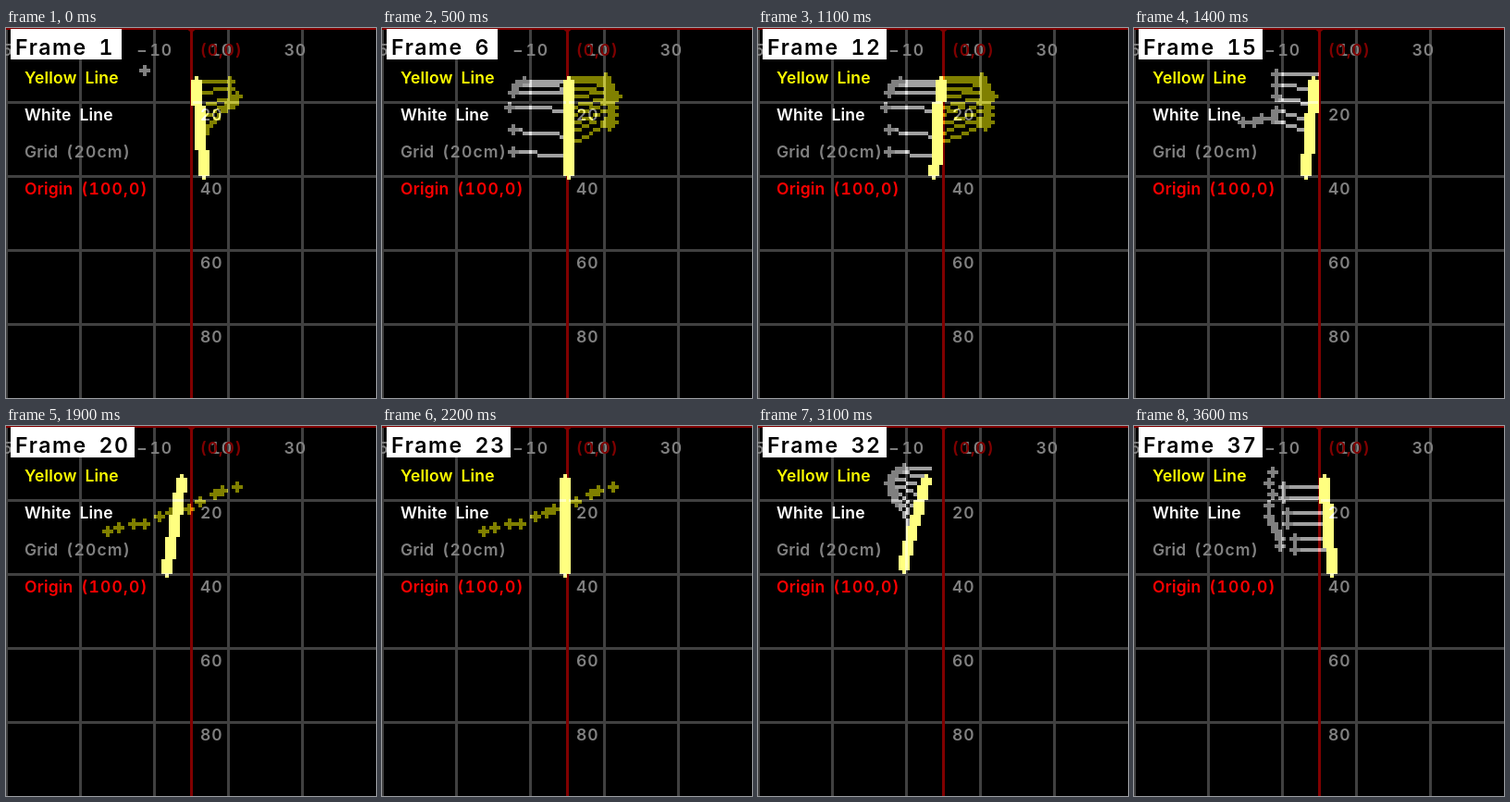
Write an HTML page with a canvas that moves like this. It is 400 px wide and 400 px high and loops after 3.7 s.

```html
<!DOCTYPE html>
<html lang="en">
<head>
<meta charset="utf-8">
<title>Lane line tracker</title>
<style>
  html, body { margin: 0; width: 100%; height: 100%; overflow: hidden; background: #000; }
  svg, canvas { position: absolute; left: 0; top: 0; width: 400px; height: 400px; }
  canvas { image-rendering: pixelated; mix-blend-mode: plus-lighter; }
  text {
    font: 600 17.5px Inter, "Liberation Sans", sans-serif;
    font-variant-numeric: tabular-nums;
    letter-spacing: .2px; word-spacing: 4px; white-space: pre;
  }
  .num { letter-spacing: .9px; fill: #808080; }
  .wide { letter-spacing: 1.2px; }
  #count { font-size: 23.1px; letter-spacing: 1.6px; word-spacing: 5px; }
</style>
</head>
<body>
<svg viewBox="0 0 400 400">
  <path id="rules" stroke="#404040" stroke-width="3"/>
  <path d="M0 .5H400M200.5 0V400" stroke="#800000" stroke-width="3"/>
  <circle cx="200.5" cy="0" r="4" fill="#800000"/>
  <g id="labels"></g>
  <text class="num" x="210" y="30" style="fill:#800000">(0,0)</text>
</svg>
<canvas id="cells" width="100" height="100"></canvas>
<svg viewBox="0 0 400 400">
  <rect id="plate" x="5" y="1" width="120" height="33" fill="#fff"/>
  <text id="count" x="10" y="28.5">Frame 1</text>
  <text x="20" y="60" fill="#ff0">Yellow Line</text>
  <text x="20" y="100" fill="#fff">White Line</text>
  <text x="20" y="140" fill="#808080">Grid <tspan class="wide">(20cm)</tspan></text>
  <text x="20" y="180" fill="#f00">Origin <tspan class="wide">(100,0)</tspan></text>
</svg>
<script>
const STEP = 100, STEPS = 37, TOP = 14, LENGTH = 25.1;
const GOLD = '#808000', GRAY = '#808080', PALE = '#a0a0a0', LINE = '#ffff80';
const $ = id => document.getElementById(id);
const ctx = $('cells').getContext('2d');

// Grid rules and axis labels
let rules = '', labels = '';
for (let p = 0; p < 400; p += 80) {
  rules += `M${p + .5} 0V400M0 ${p + .5}H400`;
  const v = p / 4 - 50;
  const text = v < 0 ? `−<tspan dx="2">${-v}</tspan>` : v;
  labels += `<text class="num" x="${p + (v < 0 ? 20 : 5)}" y="30" text-anchor="end">${text}</text>`;
  if (p) labels += `<text class="num" x="210" y="${p + 20}">${p / 4}</text>`;
}
$('rules').setAttribute('d', rules);
$('labels').innerHTML = labels;

// A trail scatters dots along a path; its first dots are linked to the line,
// each a little lower than the one before, by `slant` rows in all.
const trail = (color, path, dots, links = 0, slant = 0, knot = 1) =>
  ({ color, path, dots, links, slant, knot });

const scenes = [
  { at: 1, top: 51, bottom: 53, trails: [
    trail(GRAY, [[37, 11]], 1),
    trail(GOLD, [[60, 14], [62, 19], [59, 21]], 6, 6, 9)] },
  { at: 10, top: 49.2, bottom: 48.2, trails: [
    trail(GRAY, [[38, 14], [34, 18], [35, 33]], 6, 6, 2),
    trail(GOLD, [[60, 13], [62, 18], [61, 25]], 9, 9, 6, 2)] },
  { at: 15, top: 48.3, bottom: 46, trails: [
    trail(GRAY, [[38, 12], [38, 24], [29, 25]], 8, 5, 6)] },
  { at: 20, top: 47, bottom: 43, trails: [
    trail(GOLD, [[62, 16], [50, 21], [40, 25], [27, 28]], 12)] },
  { at: 27, top: 52, bottom: 56, trails: [
    trail(GRAY, [[34, 16], [39, 15]], 2),
    trail(GOLD, [[61, 14], [64, 20], [61, 28], [73, 32]], 11, 7, 4)] },
  { at: 32, top: 45, bottom: 38.5, trails: [
    trail(GRAY, [[39, 11], [35, 15], [37, 20]], 7, 7, 8)] },
  { at: 37, top: 51, bottom: 53, trails: [
    trail(GRAY, [[37, 12], [36, 24], [39, 32]], 9),
    trail(GRAY, [[40, 16], [41, 25], [43, 33]], 6, 6)] }
];

const lerp = (a, b, k) => a + (b - a) * k;

function random(seed) {
  return () => {
    seed = (seed * 16807) % 2147483647;
    return seed / 2147483647;
  };
}

function along(path, k) {
  const pos = k * (path.length - 1), i = Math.floor(pos);
  const a = path[i], b = path[i + 1] || a;
  return a.map((v, axis) => lerp(v, b[axis], pos - i));
}

const cell = (x, y) => ctx.fillRect(Math.round(x), Math.round(y), 1, 1);

function plus(x, y, r = 1) {
  for (let i = -r; i <= r; i++) {
    const w = r - Math.abs(i);
    ctx.fillRect(Math.round(x) - w, Math.round(y) + i, 2 * w + 1, 1);
  }
}

function trace(x0, y0, x1, y1, brush) {
  const n = Math.max(1, Math.round(Math.max(Math.abs(x1 - x0), Math.abs(y1 - y0))));
  for (let i = 0; i <= n; i++) brush(lerp(x0, x1, i / n), lerp(y0, y1, i / n));
}

function drawTrail({ color, path, dots, links, slant, knot }, lineX) {
  const rand = random(4001);
  for (let i = 0; i < dots; i++) {
    const k = dots > 1 ? i / (dots - 1) : 0;
    const [x, y] = along(path, k).map(v => v + rand() - .5);
    if (i < links) {
      const row = y + slant * k;
      ctx.fillStyle = color === GRAY ? PALE : color;
      trace(x, y, lineX(row), row, cell);
    }
    ctx.fillStyle = color;
    plus(x, y);
  }
  for (const [x, y] of path.slice(1)) if (knot > 1) plus(x, y, knot);
}

function draw(n) {
  const next = Math.max(1, scenes.findIndex(s => s.at >= n));
  const a = scenes[next - 1], b = scenes[next];
  const k = (n - a.at) / (b.at - a.at);
  const top = lerp(a.top, b.top, k), bottom = lerp(a.bottom, b.bottom, k);
  const height = Math.sqrt(LENGTH ** 2 - (bottom - top) ** 2);
  const lineX = y => lerp(top, bottom, (y - TOP) / height);

  ctx.clearRect(0, 0, 100, 100);
  for (const t of (k < .5 ? a : b).trails) drawTrail(t, lineX);
  ctx.fillStyle = LINE;
  trace(top, TOP, bottom, TOP + height, (x, y) => plus(x, y));

  $('count').textContent = 'Frame ' + n;
  $('plate').setAttribute('width', n < 10 ? 120 : 134);
}

const start = performance.now();
let shown = 0;
function tick() {
  const n = Math.floor((performance.now() - start) / STEP) % STEPS + 1;
  if (n !== shown) draw(shown = n);
  requestAnimationFrame(tick);
}
tick();
</script>
</body>
</html>
```
